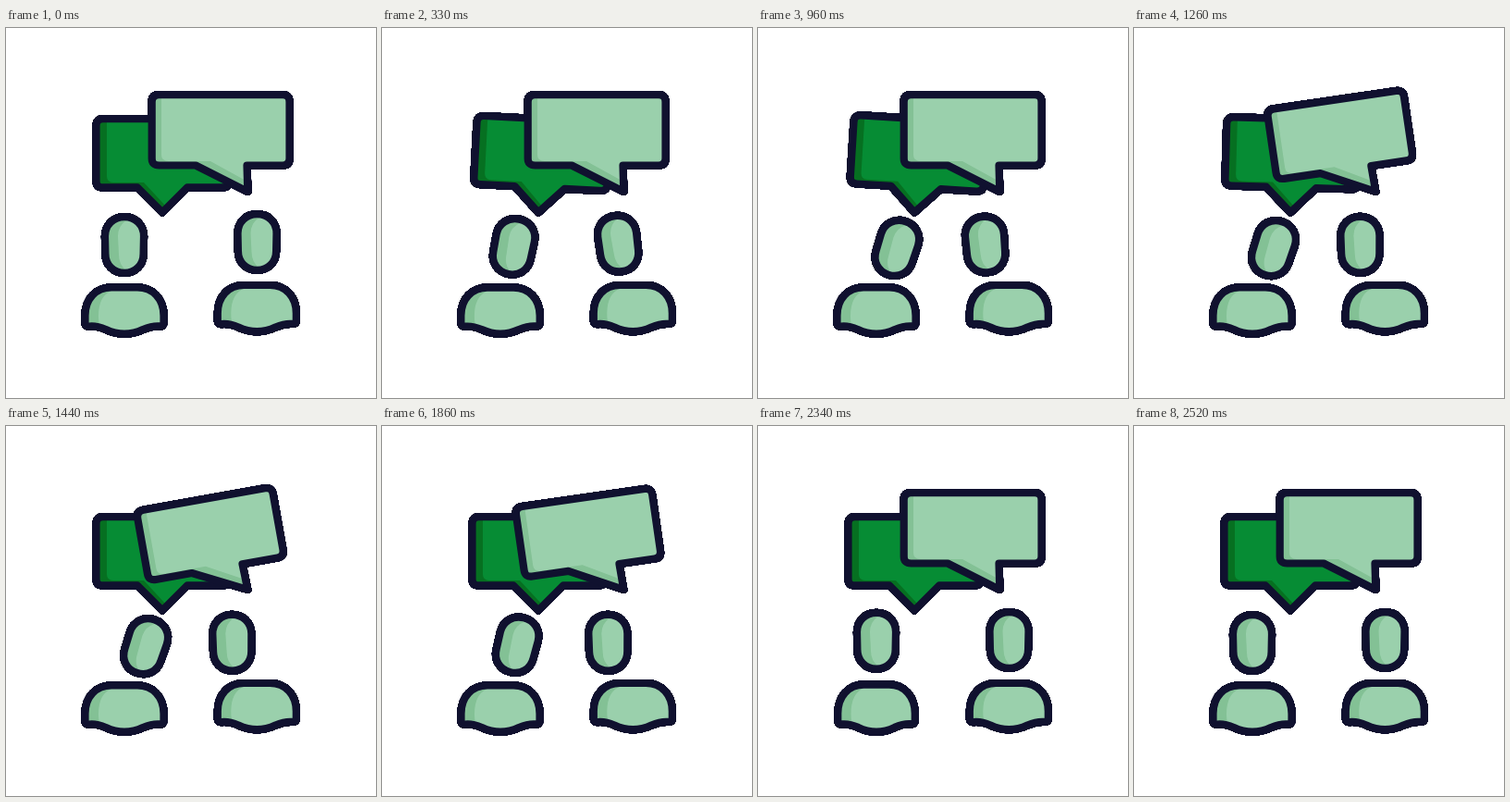
Recreate the animation shown at these times as an HTML page with a canvas. Size 400 by 400 pixels, loop 4550 ms.

```html
<!DOCTYPE html>
<html lang="en">
<head>
<meta charset="utf-8">
<title>Conversation</title>
<style>
html, body { margin: 0; width: 100%; height: 100%; overflow: hidden; background: #fff; }
canvas { display: block; width: 100vmin; height: 100vmin; filter: url(#crisp); }
svg { position: absolute; }
</style>
</head>
<body>
<svg width="0" height="0">
  <filter id="crisp" x="0" y="0" width="1" height="1" color-interpolation-filters="sRGB">
    <feComponentTransfer><feFuncA type="linear" slope="12"/></feComponentTransfer>
  </filter>
</svg>
<canvas id="stage" width="400" height="400"></canvas>
<script>
const ctx = document.getElementById('stage').getContext('2d');
const LOOP = 4550, STEP = 30;
const INK = '#10112f';
const PALE = { base: '#9ad0ac', shade: '#83c195' };
const DEEP = { base: '#068c34', shade: '#067021' };

const part = (outline, shade, colors) =>
  ({ outline: new Path2D(outline), shade: new Path2D(shade), colors });

const backBubble = part(
  'M105 98.2H234Q242 98.2 242 106V165Q242 172.4 234 172.4H196L169 199.4L142 172.4H105Q97.5 172.4 97.5 165V106Q97.5 98.2 105 98.2Z',
  'M90 90H109V160Q109 167 116 167H149L174 194L169 204L138 178H90Z', DEEP);
const frontBubble = part(
  'M165.5 72.2H299Q306.5 72.2 306.5 80V141Q306.5 148.5 299 148.5H260.5L261.3 176.8L205 148.5H165.5Q157.7 148.5 157.7 141V80Q157.7 72.2 165.5 72.2Z',
  'M150 65H168V137Q168 144 176 144H221L261 166V182L203 153H150Z', PALE);
const head = part(
  'M128 204.2C140 204.2 149 213 149 225L148.6 244C148.6 256 140 264.8 128 264.8C116 264.8 107.4 256 107.4 244L107 225C107 213 116 204.2 128 204.2Z',
  'M100 200H130V208Q121 214 121 225L122 245Q122 256 130 262V270H100Z', PALE);
const body = part(
  'M85.5 319V311C85.5 293 97 280.5 114 280.5H142C159 280.5 170.5 293 170.5 311V319Q170.5 322.6 166 322.4Q158 321.8 148 326Q128 335.4 108 326Q98 321.8 90 322.6Q85.5 323 85.5 319Z',
  'M80 275H114V284Q100 290 100 311Q100 320 103 335H80Z', PALE);

// Eased value at time t from [time, value] keys
function track(t, keys) {
  if (t <= keys[0][0]) return keys[0][1];
  for (let i = 1; i < keys.length; i++) {
    const [t0, a] = keys[i - 1], [t1, b] = keys[i];
    if (t < t1) {
      const u = (t - t0) / (t1 - t0);
      return a + (b - a) * u * u * (3 - 2 * u);
    }
  }
  return keys[keys.length - 1][1];
}

// Two full swings around a middle time
const swing = (t, mid, angle) => track(t,
  [0, angle, -angle, angle, 0].map((a, i) => [mid + (i - 2) * 281, a]));

function draw({ outline, shade, colors }, { x = 0, y = 0, px = 0, py = 0, angle = 0, sx = 1, sy = 1 } = {}) {
  ctx.save();
  ctx.translate(x + px, y + py);
  ctx.rotate(angle * Math.PI / 180);
  ctx.scale(sx, sy);
  ctx.translate(-px, -py);
  ctx.fillStyle = colors.base;
  ctx.fill(outline);
  ctx.save();
  ctx.clip(outline);
  ctx.fillStyle = colors.shade;
  ctx.fill(shade);
  ctx.restore();
  ctx.strokeStyle = INK;
  ctx.lineWidth = 8.2;
  ctx.lineJoin = 'round';
  ctx.stroke(outline);
  ctx.restore();
}

function render(t) {
  ctx.clearRect(0, 0, 400, 400);

  draw(backBubble, { px: 169, py: 200, angle: swing(t, 778, 8.3) });
  draw(frontBubble, { px: 262, py: 177, angle: swing(t, 1659, -13.5) });

  const squash = track(t, [[0, 0], [210, 2], [420, -1], [550, 0], [1860, 0], [2080, 2], [2330, -1], [2520, 0]]);
  const lean = track(t, [[0, 0], [540, 17], [1440, 18.2], [1650, 18.2], [2340, 0]]);
  draw(body, { px: 128, py: 331, sx: 1 + squash * .02, sy: 1 - squash * .017 });
  draw(head, { y: squash * 2.3, px: 128, py: 308, angle: lean });

  const shift = track(t, [[0, 0], [540, -24.3], [1350, -27], [1860, -27], [2320, 0]]);
  const tilt = track(t, [[0, 0], [540, -11], [1260, -1], [1860, -1], [2320, 0]]);
  draw(body, { x: 143.3, y: -2.5 });
  draw(head, { x: 143.5 + shift, y: -3 - shift * .1, px: 128, py: 234.5, angle: tilt });
}

const start = performance.now();
function frame() {
  const t = (performance.now() - start) % LOOP;
  render(Math.floor(t / STEP) * STEP);
  requestAnimationFrame(frame);
}
frame();
</script>
</body>
</html>
```
